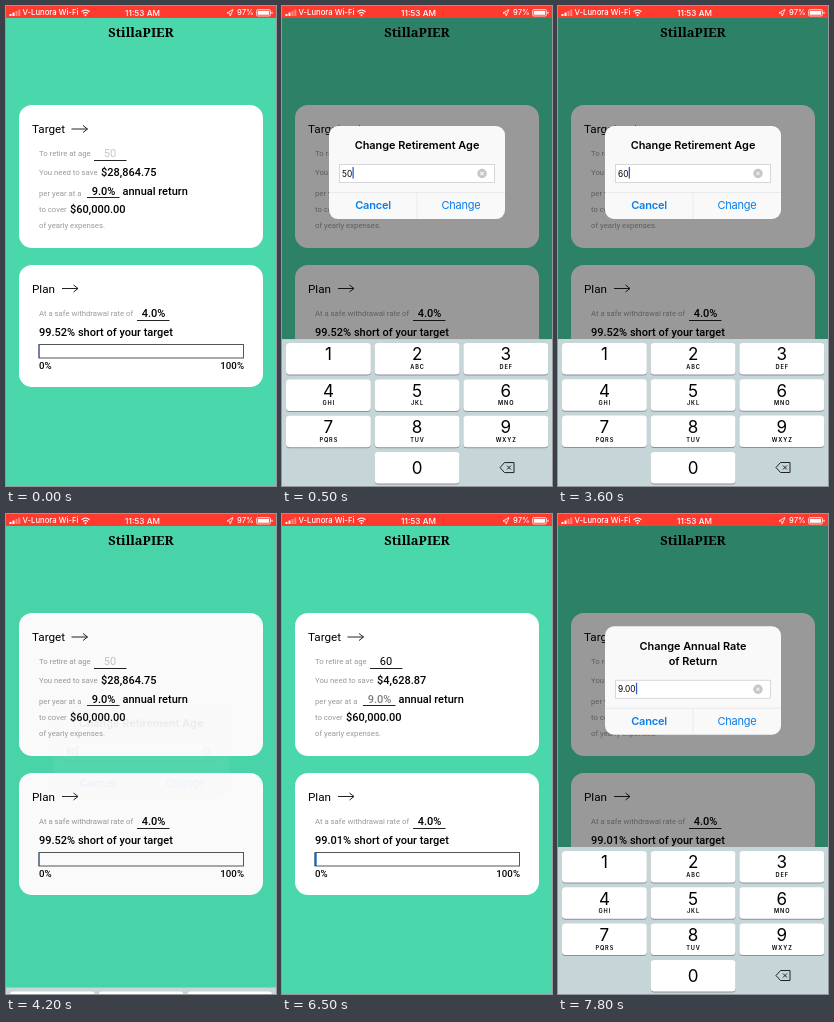
An HTML page for the animation above (8000 ms loop, 270 by 480 pixels).

```html
<!DOCTYPE html>
<html lang="en">
<head>
<meta charset="utf-8">
<title>Retirement planner</title>
<style>
html, body { margin: 0; width: 100%; height: 100%; overflow: hidden; background: #4ad7ac; }
svg { display: block; width: 100vw; height: 100vh; }
text { font-family: Roboto, sans-serif; font-size: 11px; white-space: pre; }
.bar text { font: 500 7.7px Inter, sans-serif; fill: #fff; }
.bar .clock { font-size: 8.2px; }
.brand { font: 900 13px "Noto Serif", serif; text-anchor: middle; }
.head { font-size: 11.7px; }
.note { font-size: 7.75px; fill: #999; }
.strong { font-weight: 500; }
.scale { font-size: 9.7px; font-weight: 500; }
.line { fill: none; stroke: #222; }
#dialog text { font: 11px Inter, sans-serif; letter-spacing: -.2px; text-anchor: middle; }
#dialog .title { font-size: 10.9px; font-weight: 600; letter-spacing: 0; }
#dialog .action { fill: #0a7ee6; }
#dialog .bold { font-weight: 600; }
#dialog #value { font-size: 8.3px; letter-spacing: 0; text-anchor: start; }
#keyboard text { font: 17px Inter, sans-serif; text-anchor: middle; }
#keyboard .letters { font-size: 5.6px; font-weight: 600; letter-spacing: .9px; }
</style>
</head>
<body>
<svg viewBox="0 0 270 480">
  <rect width="270" height="480" fill="#4ad7ac"/>
  <text class="brand" x="135" y="31">StillaPIER</text>

  <rect x="13" y="99" width="244" height="143" rx="13" fill="#fff"/>
  <text class="head" x="26" y="127">Target</text>
  <path class="line" d="M65.5 123H81.5M77 119.5L81.5 123L77 126.5"/>
  <text class="note" x="33" y="150">To retire at age</text>
  <text id="age" x="104" y="151" text-anchor="middle">50</text>
  <path class="line" d="M88 154.5H120.5M81 191.5H113.5"/>
  <text class="note" x="33" y="169">You need to save</text>
  <text class="strong" id="saving" x="95" y="170"></text>
  <text class="note" x="33" y="190">per year at a</text>
  <text class="strong" id="rate" x="97.5" y="188.5" text-anchor="middle">9.0%</text>
  <text class="strong" x="116.5" y="189">annual return</text>
  <text class="note" x="33" y="206">to cover</text>
  <text class="strong" x="64" y="207">$60,000.00</text>
  <text class="note" x="33" y="222">of yearly expenses.</text>

  <rect x="13" y="259" width="244" height="122" rx="13" fill="#fff"/>
  <text class="head" x="26" y="286.5">Plan</text>
  <path class="line" d="M56 282.5H72M67.5 279L72 282.5L67.5 286M131 314.5H163.5"/>
  <text class="note" x="33" y="310">At a safe withdrawal rate of</text>
  <text class="strong" x="147.5" y="311" text-anchor="middle">4.0%</text>
  <text class="strong" id="short" x="33" y="330"></text>
  <rect id="progress" x="32.5" y="338.5" height="13.5" fill="#1c6fd0"/>
  <rect x="33" y="338.5" width="204.5" height="13.5" fill="none" stroke="#555"/>
  <text class="scale" x="33" y="363">0%</text>
  <text class="scale" x="238" y="363" text-anchor="end">100%</text>

  <rect id="dim" width="270" height="480"/>

  <g class="bar">
    <rect width="270" height="12" fill="#ff3b30"/>
    <path d="M4.5 10V8M7.500 10V6.5" stroke="#fff" stroke-width="2"/>
    <path d="M10.5 10V5M13.300 10V3.5" stroke="#fff" stroke-width="2" opacity=".4"/>
    <text x="16.5" y="9.300">V-Lunora Wi-Fi</text>
    <path d="M75.5 5.700Q79.5 2.300 83.5 5.700M77.100 7.500Q79.5 5.500 81.900 7.500" fill="none" stroke="#fff" stroke-width="1.2"/>
    <circle cx="79.5" cy="9.3" r="1" fill="#fff"/>
    <text class="clock" x="136.500" y="9.500" text-anchor="middle">11:53 AM</text>
    <path d="M221 7L227 3.500L224.200 10L223.700 7.200Z" fill="none" stroke="#fff" stroke-width=".8"/>
    <text x="231" y="9.300">97%</text>
    <rect x="250.500" y="3.500" width="14" height="6.500" rx="1.500" fill="none" stroke="#fff" stroke-width=".7"/>
    <path d="M251.700 4.700H263.200V8.800H251.700ZM265.500 5.700H266.500V7.800H265.500Z" fill="#fff"/>
  </g>

  <!-- Dialog parts hang from its bottom edge. -->
  <g id="dialog">
    <rect id="panel" x="-88" width="176" rx="9" fill="#f9f9fa"/>
    <text class="title" id="title1" y="-84.5"></text>
    <text class="title" id="title2" y="-70"></text>
    <rect x="-77.5" y="-54.5" width="155" height="18" fill="#fff" stroke="#cfcfd2" stroke-width=".8"/>
    <text id="value" x="-75" y="-42.5"></text>
    <rect id="caret" y="-52" width="1.3" height="11.5" fill="#2f63d6"/>
    <g id="clear" transform="translate(65 -45.5)">
      <circle r="4.7" fill="#c6c6ca"/>
      <path d="M-1.700-1.700L1.700 1.700M1.700-1.700L-1.700 1.700" stroke="#fff"/>
    </g>
    <path d="M-88-26.500H88M0-26.500V0" stroke="#e4e4e7" stroke-width=".7"/>
    <text class="action bold" x="-44" y="-10">Cancel</text>
    <text class="action" x="44" y="-10">Change</text>
  </g>

  <g id="keyboard">
    <rect y="333" width="270" height="150" fill="#c6d5d7"/>
    <g id="keys"></g>
    <path d="M218 461.500L222.500 456.500H232V466.500H222.500ZM225 459.500L229 463.500M229 459.500L225 463.500" fill="none" stroke="#222" stroke-linejoin="round"/>
  </g>
</svg>
<script>
const $ = id => document.getElementById(id);
const clamp = v => Math.max(0, Math.min(1, v));
const set = (id, attrs) => {
  for (const name in attrs) $(id).setAttribute(name, attrs[name]);
};
const write = (id, text) => {
  if ($(id).textContent !== text) $(id).textContent = text;
};

const letters = ['', 'ABC', 'DEF', 'GHI', 'JKL', 'MNO', 'PQRS', 'TUV', 'WXYZ'];
const key = (digit, column, row, label) => {
  const x = 4 + column * 88.7, y = 337 + row * 36.3, mid = x + 42.4;
  return `<rect x="${x}" y="${y + 1}" width="84.8" height="31.5" rx="3.5" fill="#8b9295"/>
    <rect id="key${digit}" x="${x}" y="${y}" width="84.8" height="31.5" rx="3.5" fill="#fff"/>
    <text x="${mid}" y="${y + (digit ? 17.3 : 21.7)}">${digit}</text>
    <text class="letters" x="${mid + .4}" y="${y + 26}">${label}</text>`;
};
$('keys').innerHTML = letters.map((label, i) =>
  key(i + 1, i % 3, Math.floor(i / 3), label)).join('') + key(0, 1, 3, '');

// Critically damped spring from 0 to 1.
const spring = ms => {
  const x = Math.max(0, ms) * .0195;
  return 1 - (1 + x) * Math.exp(-x);
};

// Time and opacity pairs, linear in between.
const blink = [[0, 1], [1000, 1], [1250, 0], [1600, 0], [1800, 1], [2500, 1], [2700, 0],
  [2880, 0], [2890, 1], [3400, 1], [3550, 0], [3590, 0], [3595, 1], [7150, 1],
  [7350, 0], [7600, 0], [7780, 1], [8000, 1]];
const caretOpacity = t => {
  const i = blink.findIndex(p => p[0] > t);
  const [t0, a] = blink[i - 1], [t1, b] = blink[i];
  return a + (b - a) * (t - t0) / (t1 - t0);
};

function draw(t) {
  const second = t >= 6000, closing = t >= 3950 && !second;
  const shown = closing ? 1 - spring(t - 3950) : spring(t - (second ? 6600 : 0));
  const updated = t >= 4850;

  write('age', t < 5000 ? '50' : '60');
  set('age', { opacity: .22 + .78 * clamp((t - 4820) / 230) });
  set('rate', { opacity: 1 - .78 * clamp((t - 6450) / 80) });
  write('saving', updated ? '$4,628.87' : '$28,864.75');
  write('short', (updated ? '99.01' : '99.52') + '% short of your target');
  set('progress', { width: updated ? 2.2 : 1 });

  set('dim', { opacity: .4 * shown });
  set('keyboard', { transform: `translate(0 ${(1 - shown) * 147})` });
  for (const [digit, start, end] of [[6, 2700, 2880], [0, 3400, 3580]])
    set('key' + digit, { fill: t >= start && t < end ? '#b3bfc5' : '#fff' });

  const height = second ? 108.5 : 93;
  const center = 166.5 + (1 - shown) * 73.5;
  const zoom = closing ? 1 : 1.2 - .2 * shown;
  set('dialog', {
    opacity: clamp(shown * 1.2),
    transform: `translate(135 ${center}) scale(${zoom}) translate(0 ${height / 2})`
  });
  set('panel', { y: -height, height });
  write('title1', second ? 'Change Annual Rate' : '');
  write('title2', second ? 'of Return' : 'Change Retirement Age');

  const value = second ? '9.00' : t < 2000 ? '50' : t < 2880 ? '' : t < 3580 ? '6' : '60';
  write('value', value);
  set('caret', {
    x: -74.7 + (value ? $('value').getComputedTextLength() : 0),
    opacity: caretOpacity(t)
  });
  set('clear', { opacity: value ? 1 : 0 });
}

function tick() {
  draw(performance.now() % 8000);
  requestAnimationFrame(tick);
}
tick();
</script>
</body>
</html>
```
